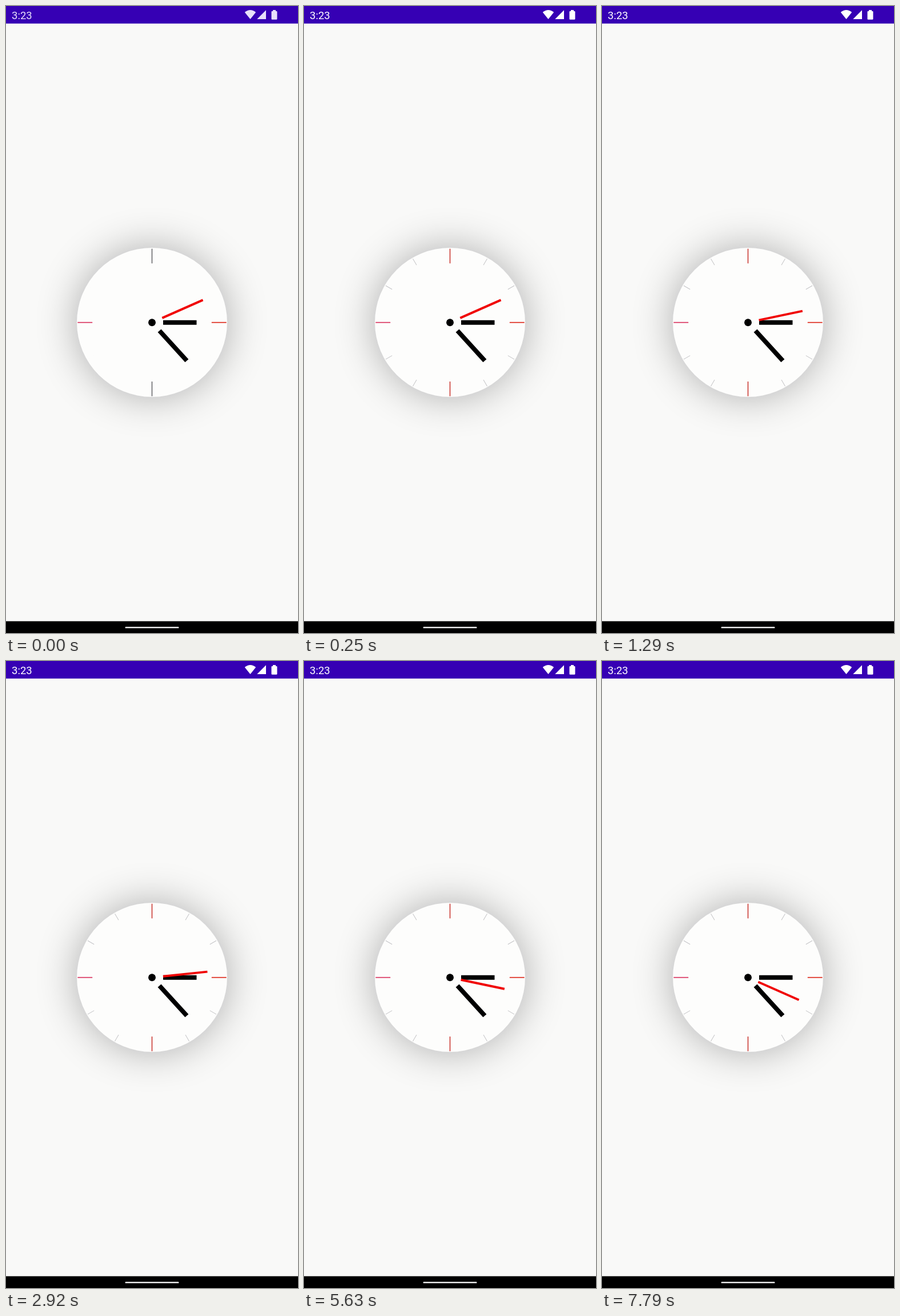
These frames come from a looping animation (511x1097 px, 8000 ms). An HTML page:

```html
<!DOCTYPE html>
<html lang="en">
<head>
<meta charset="utf-8">
<title>Analog clock</title>
<style>
  html, body { margin: 0; width: 100%; height: 100%; overflow: hidden; background: #f9f9f8; }
  svg { display: block; position: absolute; left: 0; top: 0; }
  .face {
    position: absolute; left: 124px; top: 423.4px; width: 263px; height: 260.6px;
    border-radius: 50%; background: #fdfdfc;
    box-shadow: 0 0 70px rgba(0, 0, 4, .31);
  }
  text { font: 18.5px Roboto, sans-serif; }
</style>
</head>
<body>
<div class="face"></div>
<svg width="511" height="1097" viewBox="0 0 511 1097">
  <rect width="511" height="30.7" fill="#3600b4"/>
  <g id="status" fill="#fff">
    <text x="10" y="22.5">3:23</text>
    <path d="M427.5 23L417.8 11Q427.5 3.2 437.2 11Z"/>
    <path d="M439.3 23H455V7.3Z"/>
    <path d="M467 9V7h5v2h1.2q1.3 0 1.3 1.3v12.2q0 1.3-1.3 1.3h-7.4q-1.3 0-1.3-1.3V10.3q0-1.3 1.3-1.3Z"/>
  </g>
  <rect y="1076.4" width="511" height="20.6"/>
  <rect x="208.5" y="1086.2" width="94" height="2.4" rx="1.2" fill="#fff"/>
  <g id="dial" transform="translate(255.5 553.7) scale(1 .991)"></g>
</svg>
<script>
const LOOP = 8000, TICK = 1000, FIRST_TICK = 290, START_SECOND = 11;
const dial = document.getElementById('dial');
const statusIcons = document.getElementById('status');

function add(name, attrs) {
  const el = document.createElementNS('http://www.w3.org/2000/svg', name);
  for (const key in attrs) el.setAttribute(key, attrs[key]);
  return dial.appendChild(el);
}

// Radial line; 0 degrees points to 3 o'clock.
const turn = (el, deg) => el.setAttribute('transform', `rotate(${deg})`);
function spoke(deg, from, to, width, stroke) {
  const el = add('line', { x1: from, x2: to, 'stroke-width': width, stroke });
  turn(el, deg);
  return el;
}

const minor = [], upright = [];
const quarterColors = ['#de2a1c', '#cc433d', '#da3560', '#cc433d'];
for (let i = 0; i < 12; i++) {
  if (i % 3) {
    minor.push(spoke(i * 30, 117, 130, 1, '#c4c4c6'));
  } else {
    const mark = spoke(i * 30, 104.3, 130.2, 1.7, quarterColors[i / 3]);
    if (i % 6) upright.push(mark);
  }
}

spoke(0, 19.5, 78, 8, '#000');
spoke(48, 19.5, 91, 8, '#000');
const secondHand = spoke(0, 19.5, 97.5, 4, '#f00505');
add('circle', { r: 6.5 });

const mix = (a, b, k) => `rgb(${a.map((v, i) => Math.round(v + (b[i] - v) * k))})`;

function render(t) {
  const second = START_SECOND + Math.floor((t - FIRST_TICK) / TICK) + 1;
  turn(secondHand, second * 6 - 90);

  // The fine marks settle in at the start of each loop.
  const settle = Math.min(1, t / 250);
  for (const el of minor) el.setAttribute('opacity', settle);
  for (const el of upright) el.setAttribute('stroke', mix([112, 112, 116], [204, 67, 61], settle));
  statusIcons.setAttribute('fill', mix([232, 224, 250], [255, 255, 255], settle));
}

function frame() {
  render(performance.now() % LOOP);
  requestAnimationFrame(frame);
}
render(0);
requestAnimationFrame(frame);
</script>
</body>
</html>
```
